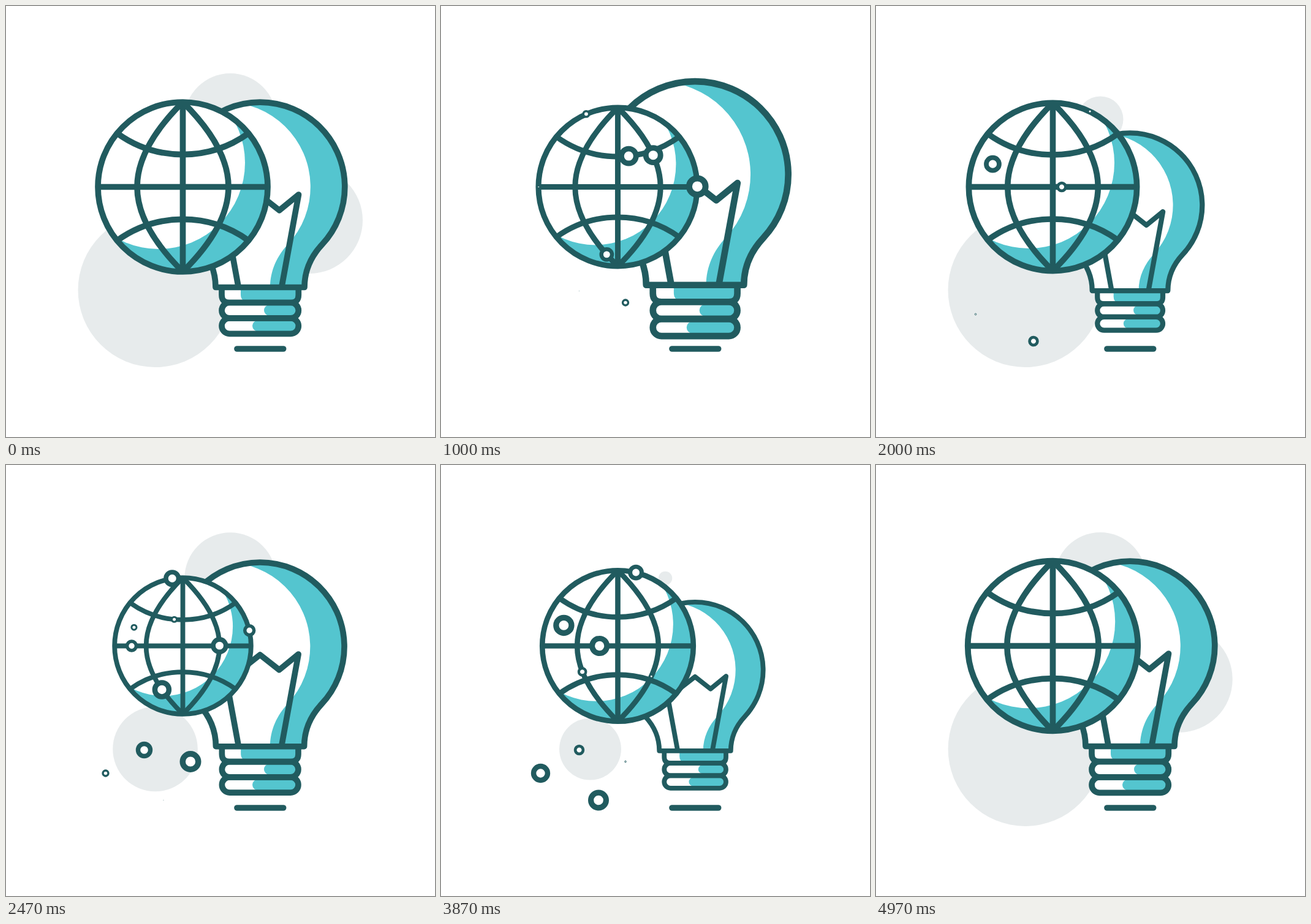
Animation of 700 by 704 pixels, one loop 5010 ms. Source, as an HTML page:

```html
<!DOCTYPE html>
<html lang="en">
<head>
<meta charset="utf-8">
<title>Global ideas</title>
<style>
  html, body { margin: 0; width: 100%; height: 100%; overflow: hidden; background: #fff; }
  svg { display: block; width: 700px; height: 704px; }
  .line { fill: none; stroke: #215b5f; stroke-width: 9.7; stroke-linejoin: round; }
  .teal { fill: #54c5cf; }
  .white { fill: #fff; }
  .halo { fill: #e7ebec; }
  .dot { fill: #fff; stroke: #215b5f; stroke-width: .54; }
</style>
</head>
<body>
<svg viewBox="0 0 700 704">
  <defs>
    <path id="glass" d="M342 459.5C342 432 330.4 408 313.4 389.8A138.3 138.3 0 1 1 515.6 389.8C498.6 408 487 432 487 459.5Z"/>
    <clipPath id="inGlass"><use href="#glass"/></clipPath>
    <clipPath id="inGlobe"><circle r="138.5"/></clipPath>
  </defs>

  <g id="halos"></g>
  <path class="line" stroke-linecap="round" d="M377 560H452.6"/>

  <g id="bulb">
    <use href="#glass" class="teal"/>
    <g clip-path="url(#inGlass)"><use href="#glass" class="white" x="-56"/></g>
    <path class="line" d="M379.2 459L351.5 308L383 333.7L414.5 309L446 333.7L477.5 308L449.8 459"/>

    <path class="white" d="M352 459.5H477.3V472Q477.3 484.5 465 484.5H364Q352 484.5 352 472Z"/>
    <rect class="white" x="352" y="484.5" width="125.3" height="25.4" rx="12.7"/>
    <rect class="white" x="352" y="509.9" width="125.3" height="25.4" rx="12.7"/>
    <path class="teal" d="M383 459.5H477.3V472Q477.3 484.5 465 482H393Q383 482 383 471Z"/>
    <rect class="teal" x="421" y="488" width="55" height="18" rx="9"/>
    <rect class="teal" x="402" y="513.5" width="74" height="18" rx="9"/>
    <path class="line" d="M352 459.5V472Q352 484.5 364.5 484.5H464.8Q477.3 484.5 477.3 472V459.5"/>
    <rect class="line" x="352" y="484.5" width="125.3" height="25.4" rx="12.7"/>
    <rect class="line" x="352" y="509.9" width="125.3" height="25.4" rx="12.7"/>
    <use href="#glass" class="line"/>
  </g>

  <g id="globe">
    <circle class="teal" r="138.5"/>
    <g clip-path="url(#inGlobe)"><circle class="white" cx="-39.5" cy="-39.5" r="141"/></g>
    <path class="line" d="M-138.5 0H138.5M0 -138.5V138.5"/>
    <path class="line" id="west" d="M0 -138.5C-47 -92 -74.5 -46 -74.5 0S-47 92 0 138.5"/>
    <path class="line" id="east" d="M0 -138.5C47 -92 74.5 -46 74.5 0S47 92 0 138.5"/>
    <path class="line" id="north" d="M-107 -87.5A183 183 0 0 0 107 -87.5"/>
    <path class="line" d="M-107 87.5A183 183 0 0 1 107 87.5"/>
    <circle class="line" r="138.5"/>
  </g>
  <g id="loose"></g>
</svg>

<script>
const FPS = 30, FRAMES = 150, LOOP = 5010, CYCLE = 50;
const $ = id => document.getElementById(id);
const ease = t => t * t * (3 - 2 * t);
const clamp = t => Math.max(0, Math.min(1, t));

// Eased value at frame n from [frame, value] pairs
function track(n, keys) {
  for (let i = 1; i < keys.length; i++) {
    const [a, v] = keys[i - 1], [b, w] = keys[i];
    if (n <= b) return v + (w - v) * ease(clamp((n - a) / (b - a)));
  }
  return keys[keys.length - 1][1];
}

function addCircle(parent, cls, r) {
  const c = document.createElementNS('http://www.w3.org/2000/svg', 'circle');
  c.setAttribute('class', cls);
  c.setAttribute('r', r);
  parent.appendChild(c);
  return c;
}

function place(el, x, y, s) {
  el.setAttribute('visibility', s > .01 ? 'visible' : 'hidden');
  el.setAttribute('transform', `translate(${x} ${y}) scale(${s})`);
}

const pulse = (start, len) => [[start, 0], [start + len, 1], [start + 2 * len, 0]];

const halos = [
  { x: 495, y: 350, r: 87, at: [0, 60, 90, 120, 150] },
  { x: 366, y: 185, r: 75, at: [0, 45, 75, 105, 150] },
  { x: 243.5, y: 464, r: 126, at: [0, 30, 60, 90, 150] }
].map(h => ({
  ...h,
  keys: h.at.map((f, i) => [f, i % 2 ? 0 : 1]),
  el: addCircle($('halos'), 'halo', h.r)
}));

const loose = [[257, 547.5], [162.5, 503.5], [225.5, 465.5], [301, 484.5]].map(([x, y], i) => ({
  x, y, keys: pulse(5 + 3 * i, 10), el: addCircle($('loose'), 'dot', .73)
}));

const rim = deg => {
  const a = deg * Math.PI / 180;
  return [138.8 * Math.cos(a), 138.8 * Math.sin(a)];
};
const along = (id, from, to) => {
  const path = $(id), len = path.getTotalLength();
  return e => {
    const p = path.getPointAtLength(len * (from + (to - from) * e));
    return [p.x, p.y];
  };
};

// Dots travelling on the globe, each starting three frames after the last
const riders = [
  () => [-99, -37.7],
  e => [40 - 183.5 * e, 0],
  e => rim(-61 - 58.5 * e),
  along('west', .595, 1),
  along('east', .708, .113),
  e => rim(-22.8 + 45 * e),
  along('north', .357, 1)
].map((pos, i) => ({
  pos, start: 3 * i, keys: pulse(3 * i, 15), el: addCircle($('globe'), 'dot', .73)
}));

const bulbKeys = [[0, 1], [15, .8], [30, 1.1], [45, 1]];
const globeKeys = [[0, 1]];
for (let c = 0; c < FRAMES; c += CYCLE) {
  globeKeys.push([c + 8, 1], [c + 23, .8], [c + 38, 1.1], [Math.min(c + 53, FRAMES), 1]);
}

function draw(n) {
  const m = n % CYCLE;
  for (const h of halos) place(h.el, h.x, h.y, track(n, h.keys));
  for (const d of loose) place(d.el, d.x, d.y, 17.5 * track(m, d.keys));
  for (const d of riders) {
    const [x, y] = d.pos(ease(clamp((m - d.start) / 30)));
    place(d.el, x, y, 19.6 * track(m, d.keys));
  }
  $('bulb').setAttribute('transform',
    `translate(414.5 497) scale(${track(m, bulbKeys)}) translate(-414.5 -497)`);
  $('globe').setAttribute('transform', `translate(288.5 295.5) scale(${track(n, globeKeys)})`);
}

const origin = performance.now();
function tick() {
  const t = (performance.now() - origin) % LOOP;
  draw(Math.min(FRAMES - 1, Math.floor((t + 4) * FPS / 1000)));
  requestAnimationFrame(tick);
}
tick();
</script>
</body>
</html>
```
